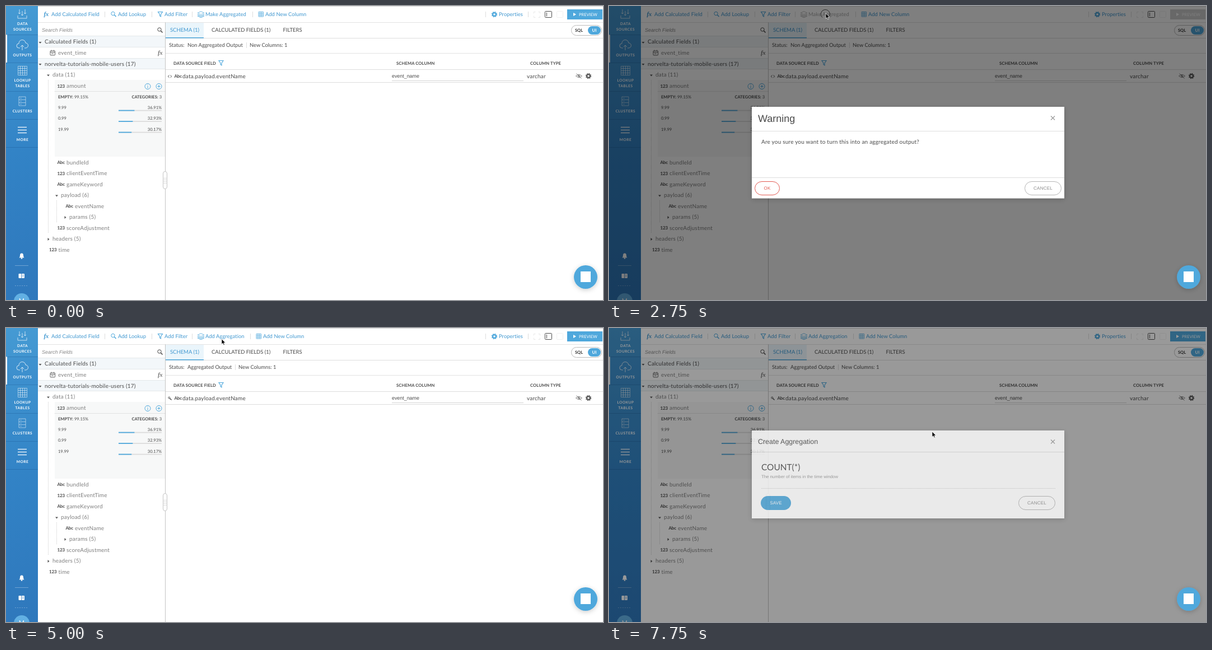
These frames come from a looping animation (1066 by 525 pixels, 8000 ms). An HTML page:

```html
<!DOCTYPE html>
<html lang="en">
<head>
<meta charset="utf-8">
<title>Aggregated output</title>
<style>
html, body { margin: 0; width: 100%; height: 100%; overflow: hidden; background: #fff; }
svg { display: block; width: 1066px; height: 525px; }
text { font: 10px Lato, sans-serif; letter-spacing: .2px; fill: #4a4a4a; white-space: pre; text-rendering: geometricPrecision; }
.tree { fill: #808080; }
.tool { font-size: 9.4px; letter-spacing: .06px; fill: #3f97d0; }
.stat { font-size: 9.4px; letter-spacing: -.02px; }
.tab { font-size: 9.5px; letter-spacing: -.03px; }
.head { font-size: 7.6px; font-weight: 700; letter-spacing: .12px; }
.type { font-size: 8px; font-weight: 700; letter-spacing: -.2px; }
.mini { font-size: 7.5px; letter-spacing: 0; }
.nav { font-size: 6.6px; font-weight: 700; letter-spacing: .45px; fill: #fff; }
.big { font-size: 11px; letter-spacing: .05px; }
.side { font-size: 10.3px; letter-spacing: .04px; }
.title { font-size: 15.4px; letter-spacing: 0; }
.bold { font-weight: 700; }
.sans { font-family: "Liberation Sans", Arial, sans-serif; letter-spacing: 0; }
.hint { font: italic 9px "Liberation Sans", Arial, sans-serif; letter-spacing: 0; fill: #888; }
.btn { font: 8px "Liberation Sans", Arial, sans-serif; letter-spacing: .25px; }
.fx { font: italic 700 11px "Liberation Serif", serif; letter-spacing: -.3px; }
.blue { fill: #3f97d0; }
.mid { text-anchor: middle; }
.end { text-anchor: end; }
</style>
</head>
<body>
<svg id="stage" viewBox="0 0 1066 525"></svg>
<script>
const BLUE = '#4fa8dc', INK = '#4a4a4a', LOOP = 8000, STEP = 250;

const text = (x, y, s, cls = '', fill = '') =>
  `<text x="${x}" y="${y}" dy=".35em" class="${cls}"${fill && ` style="fill:${fill}"`}>${s}</text>`;
const sans = (x, y, s, size, fill = INK) =>
  `<text x="${x}" y="${y}" dy=".35em" class="sans" style="font-size:${size}px;fill:${fill}">${s}</text>`;
const rect = (x, y, w, h, fill, rx = 0, stroke = 'none') =>
  `<rect x="${x}" y="${y}" width="${w}" height="${h}" rx="${rx}" fill="${fill}" stroke="${stroke}"/>`;
const circle = (x, y, r, fill, stroke = 'none', more = '') =>
  `<circle cx="${x}" cy="${y}" r="${r}" fill="${fill}" stroke="${stroke}" ${more}/>`;
const path = (d, stroke = INK, w = 1, fill = 'none', more = '') =>
  `<path d="${d}" stroke="${stroke}" stroke-width="${w}" fill="${fill}" ${more}/>`;
const solid = (d, fill) => path(d, 'none', 0, fill);
const hline = (x, y, x2, c = '#ddd', more = '') => path(`M${x} ${y}H${x2}`, c, 1, 'none', more);
const vline = (x, y, y2, c = '#ddd', more = '') => path(`M${x} ${y}V${y2}`, c, 1, 'none', more);
const group = (id, body) => `<g id="${id}">${body}</g>`;
const soft = body => `<g filter="url(#soft)">${body}</g>`;
const DOTS = 'stroke-dasharray="1 1"';

const lens = (x, y, c) => circle(x, y, 3.2, 'none', c) + path(`M${x + 2.3} ${y + 2.3}l3.2 3.2`, c, 1.6);
const funnel = (x, y) => path(`M${x} ${y}h8l-3 4.5v4l-2 -1.5v-2.5z`, BLUE, 1.1);
const gear = (x, y, c) => circle(x, y, 2.9, 'none', c, 'stroke-width="2.2"') +
  circle(x, y, 4.4, 'none', c, 'stroke-width="1.6" stroke-dasharray="1.73 1.73"');
const layers = c => path('M342 12.5l6 -2.8 6 2.8 -6 2.8z', c, .8) +
  path('M342 15.2l6 2.8 6 -2.8M342 17.7l6 2.8 6 -2.8', c, 1.1);
const grid = (x, y, w, h, c, n) => {
  let d = `M${x} ${y}h${w}v${h}h${-w}z`;
  for (let i = 1; i < n; i++) d += `M${x} ${y + h * i / n}h${w}M${x + w * i / n} ${y}v${h}`;
  return path(d, c, .8);
};
const arrow = (x, y, open) => solid(open ? `M${x - 2.5} ${y - 1}h5l-2.5 3z` : `M${x - 1} ${y - 2.5}v5l3 -2.5z`, '#555');
const cross = (x, y) => path(`M${x - 3.5} ${y - 3.5}l7 7m0 -7l-7 7`, '#999', 1.2);
const pill = (x, y, w, h, s, fill, ink, stroke) =>
  (stroke ? rect(x + .5, y + .5, w - 1, h - 1, fill, h / 2, stroke) : rect(x, y, w, h, fill, h / 2)) +
  text(x + w / 2, y + h / 2, s, 'btn mid', ink);
const cancel = (x, y) => pill(x, y, 66, 25, 'CANCEL', '#fff', '#888', '#b5b5b5');

function nav() {
  const faint = 'rgba(255,255,255,.65)', pale = 'rgba(255,255,255,.85)';
  let s = rect(0, 0, 57, 525, 'url(#sky)') + rect(0, 51, 57, 50, 'rgba(0,70,150,.03)') + rect(0, 51, 2, 50, '#fff');
  for (const y of [51, 101, 152, 202, 252]) s += hline(0, y + .5, 57, 'rgba(10,60,120,.25)');
  const labels = [[32, 'DATA'], [42, 'SOURCES'], [87.5, 'OUTPUTS'], [133, 'LOOKUP'], [143, 'TABLES'], [188, 'CLUSTERS'], [238.5, 'MORE']];
  for (const [y, label] of labels) s += text(29.5, y, label, 'nav mid');
  s += path('M24 6v8m-2 -2l2 2 2 -2M34 6v8m-2 -2l2 2 2 -2M29 9v8m-2 -2l2 2 2 -2M21 17v5h16v-5', pale, .8);
  s += path('M25 75h-2a4 4 0 0 1 0 -8a6 6 0 0 1 12 -1a4.5 4.5 0 0 1 0 9h-2M29 79v-9m-3 3l3 -3 3 3', pale, .9);
  s += grid(21.5, 107.5, 16, 16, faint, 4);
  s += path('M23 162h12v16h-12zM23 167.3h12M23 172.6h12M25.5 164.6h2M25.5 170h2M25.5 175.3h2', faint, .8);
  s += path('M21 216.5h16M21 221.5h16M21 226.5h16', pale, 1.3);
  s += solid('M23.5 449.5q1.5 -1.5 1.5 -4q0 -4 3 -4t3 4q0 2.5 1.500 4z', '#fff') + circle(28, 450.5, 1.3, '#fff');
  s += rect(22.5, 478, 10.5, 8, '#fff', 1) + path('M27.7 478v8M29.5 480.5h2M29.5 483h2', '#2f79bd', .9);
  s += hline(16, 463.5, 40, 'rgba(255,255,255,.3)') + hline(16, 499.5, 40, 'rgba(255,255,255,.3)', 'stroke-dasharray="2 2"');
  return s + circle(28, 527, 14, '#62b0e3') + text(28, 526.5, 'M', 'mid big', '#fff');
}

function toolbar() {
  let s = hline(57, .5, 1066, '#d5d5d5') + hline(57, 29.5, 1066, '#e3e3e3');
  for (const x of [176.5, 260.5, 332.5, 856.5, 932.5]) s += vline(x, 10, 20);
  s += text(67.5, 14.5, 'fx', 'fx', '#3f97d0') + text(81, 15, 'Add Calculated Field', 'tool');
  s += lens(191, 13.5, BLUE) + text(200, 15, 'Add Lookup', 'tool');
  s += funnel(271.5, 10.5) + text(283, 15, 'Add Filter', 'tool');
  s += group('columnTool', vline(440.5, 10, 20) + grid(451, 10.5, 8.5, 8.5, BLUE, 3) + text(463, 15, 'Add New Column', 'tool'));
  s += group('make', text(356, 15, 'Make Aggregated', 'tool') + layers(BLUE));
  s += group('makeOff', text(356, 15, 'Make Aggregated', 'tool', '#aaa') + layers('#aaa') +
    path('M381 20.5A8 8 0 1 1 393.5 18', '#555'));
  s += group('add', group('flash', rect(365, 5, 46, 20, '#dde8f0')) + text(356, 15, 'Add Aggregation', 'tool') + layers(BLUE));
  s += gear(872, 15, BLUE) + text(880, 15, 'Properties', 'tool');
  s += path('M945.5 10.5h-3v3m0 4v3h3m5 0h3v-3m0 -4v-3h-3', '#e8e8e8') + rect(983.5, 9.5, 11, 11, 'none', 1, '#f0f0f0');
  s += rect(962.5, 9.5, 12, 11, 'none', 1, INK) + vline(965.5, 11.5, 18.5, INK);
  return s + group('preview', rect(1002, 6, 63, 18, 'inherit')) +
    solid('M1013 12v6l5 -3z', '#fff') + text(1023, 15, 'PREVIEW', 'mini', '#fff');
}

function sidebar() {
  let s = text(64, 43, 'Search Fields', 'hint') + lens(274, 42, INK);
  s += rect(57, 54, 227, 19, '#f3f7fa') + rect(57, 94, 227, 18, '#f3f7fa');
  for (const y of [53, 73, 93, 112]) s += hline(57, y + .5, 284, '#e4e8ea');
  s += arrow(61, 65, 1) + text(69, 63.5, 'Calculated Fields (1)');
  s += rect(79, 80, 8.5, 8, 'none', 1, '#666') + path('M79 82.5h8.5M81 78.5v2M85.5 78.5v2M81 85h4', '#666') +
    text(93, 83.5, 'event_time', 'tree') + text(271, 83, 'fx', 'fx', '#777');
  s += arrow(61, 104, 1) + text(69, 103, 'norvelta-tutorials-mobile-users (17)');
  s += vline(75.5, 132, 406, '#ccc', DOTS) + vline(90.5, 347, 387, '#ccc', DOTS);
  s += rect(87, 132, 197, 137, '#f7f8f8') + hline(87, 152.5, 284, '#ccc', DOTS);
  const rows = [
    [122.5, 83, 'data (11)', 1], [142.5, 108, 'amount', '123'], [279, 108, 'bundleId', 'Abc'],
    [298.5, 108, 'clientEventTime', '123'], [318, 108, 'gameKeyword', 'Abc'], [337.5, 98, 'payload (6)', 1],
    [357, 123, 'eventName', 'Abc'], [376.5, 113, 'params (5)', 0], [396, 108, 'scoreAdjustment', '123'],
    [415.5, 83, 'headers (5)', 0], [435, 93.5, 'time', '123']];
  for (const [y, x, label, kind] of rows)
    s += text(x, y, label, 'tree') + (kind.length ? text(x - 16.5, y + .5, kind, 'type') : arrow(x - 7.5, y + 1, kind));
  s += circle(253, 143.5, 5, 'none', BLUE) + path('M253 143v3.5M253 140.5v1.2', BLUE) +
    circle(273, 143.5, 5, 'none', BLUE) + path('M270.5 143.5h5M273 141v5', BLUE);
  s += text(93, 162, '<tspan class="bold">EMPTY:</tspan> 99.15%', 'mini') +
    text(278, 162, '<tspan class="bold">CATEGORIES:</tspan> 3', 'mini end');
  [['9.99', 36.91], ['0.99', 32.93], ['19.99', 30.17]].forEach(([value, share], i) => {
    const y = 181 + 19.5 * i;
    s += text(93, y, value, 'mini') + text(278, y, share + '%', 'mini end') +
      rect(201, y + 4.7, 77, 1.8, '#dcdcdc') + rect(201, y + 4.7, .77 * share, 1.8, BLUE);
  });
  s += vline(284.5, 29, 525, '#c4c4c4') + rect(280.5, 295.5, 7, 31, '#fff', 3.5, '#c4c4c4');
  for (let i = 0; i < 8; i++) s += rect(282 + 3 * (i % 2), 307 + 3 * (i >> 1), 1, 1, '#aaa');
  return s;
}

const status = (kind, x) => text(324, 70, kind, 'stat') + vline(x - 5.5, 65, 75) + text(x, 70, 'New Columns: 1', 'stat');

function table() {
  let s = rect(285, 30, 68, 27, '#eaf5fb') + hline(285, 57.5, 1066) + rect(285, 56, 68, 1.5, BLUE);
  s += text(293, 43, 'SCHEMA (1)', 'tab blue') + text(367, 43, 'CALCULATED FIELDS (1)', 'tab') + text(494.5, 43, 'FILTERS', 'tab');
  s += rect(1009.5, 34.5, 54, 18, '#fff', 9, '#bbb') + text(1016, 43.5, 'SQL', 'mini bold', '#333') +
    rect(1039, 36, 23, 15, BLUE, 7.5) + text(1050.5, 43.5, 'UI', 'mini mid bold', '#fff');
  s += text(291, 70, 'Status:', 'stat') + hline(285, 84.5, 1066, '#e2e2e2');
  s += group('plainStatus', status('Non Aggregated Output', 435) +
    path('M291.5 123.5l-2.3 2.2 2.3 2.2M293.5 123.5l2.3 2.2 -2.3 2.2'));
  s += group('aggStatus', status('Aggregated Output', 415) + circle(291.3, 124.5, 1.5, 'none', INK) + path('M292.3 125.5l3.2 3', INK, 1.5));
  s += text(299, 102, 'DATA SOURCE FIELD', 'head') + funnel(380, 97.5) +
    text(697, 102, 'SCHEMA COLUMN', 'head') + text(936, 102, 'COLUMN TYPE', 'head');
  s += hline(285, 113.5, 1066) + hline(285, 136.5, 1066);
  s += text(300.5, 125.5, 'Abc', 'type') + text(315, 125, 'data.payload.eventName');
  s += sans(689, 124.5, 'event_name', 8.9) + hline(689, 133.5, 924, '#d5d5d5') + text(930, 125, 'varchar');
  s += path('M1017.5 125q5.5 -5 11 0q-5.5 5 -11 0zM1018.5 120.5l9 9', '#777', .9) + circle(1023, 125, 1.5, 'none', '#777');
  return s + gear(1040, 125, '#5a5a5a');
}

const box = (x, y, w, h) => soft(rect(x, y, w, h, '#fff'));

function warning() {
  return box(255, 180, 558, 163.5) + sans(266, 201, 'Warning', 18) + cross(792.5, 200) +
    hline(255, 223.5, 813) + hline(255, 306.5, 813) +
    text(272, 242, 'Are you sure you want to turn this into an aggregated output?') +
    pill(260, 313, 45, 25, 'OK', '#fff', '#e25a52', '#e25a52') + cancel(742, 313);
}

function picker() {
  let s = box(87, 40, 894, 444) + sans(104, 76, 'Add Aggregation', 12.5) + cross(960, 60) +
    sans(104, 89.5, 'Please select an aggregation to use.', 7.8, '#999');
  s += rect(104.5, 96.5, 510, 342, 'none', 0, '#d8d8d8') + rect(110.5, 107.5, 174, 26, '#fff', 13, '#bbb') +
    rect(296.5, 107.5, 174, 26, '#fff', 13, '#bbb');
  s += sans(117, 120, 'All', 9) + solid('M269.5 118.5h6l-3 3z', '#666') + text(303, 120, 'Search Calculated Fields', 'hint');
  s += group('caret', rect(302, 114, 1, 11, '#333')) + hline(104, 145.5, 614) + rect(105, 146, 501.5, 71, '#e9f5fa');
  const items = [['COUNT(*)', 'items'], ['COUNT', 'values'], ['COUNT_IF', '`true` values'], ['COUNT_DISTINCT', 'distinct values']];
  items.forEach(([name, what], i) => {
    const y = 72 * i;
    s += text(117, 169.5 + y, name, 'big bold') + text(117, 184 + y, `The number of ${what} in the time window`, 'big') +
      pill(541, 170 + y, 54, 22, 'SELECT', BLUE, '#fff') + hline(104, 217.5 + y, 606.5);
  });
  s += vline(606.5, 146, 438, '#eee') + rect(608, 148, 5, 51, '#d0d0d0', 2);
  s += text(621, 79.5, 'COUNT(*)', 'side bold') + text(621, 93.5, 'The number of items in the time window', 'side');
  return s + cancel(104, 453);
}

function creator() {
  return box(255, 183, 558, 157) + sans(266, 203, 'Create Aggregation', 12.45) + cross(792.5, 203) + hline(255, 221.5, 813) +
    text(272, 249, 'COUNT(*)', 'title') + sans(272, 265.5, 'The number of items in the time window', 7.75, '#999') +
    hline(272, 286.5, 797, '#ccc', DOTS) + pill(271, 300, 54, 25, 'SAVE', BLUE, '#fff') + cancel(731, 300);
}

document.getElementById('stage').innerHTML =
  `<defs><linearGradient id="sky" x2="0" y2="1"><stop stop-color="#459ad3"/><stop offset=".5" stop-color="#3283c6"/><stop offset="1" stop-color="#2f78bc"/></linearGradient>
  <filter id="soft" x="-20%" y="-20%" width="140%" height="150%"><feDropShadow dx="0" dy="2" stdDeviation="4" flood-opacity=".2"/></filter></defs>` +
  rect(0, 0, 1066, 525, '#fff') + toolbar() + sidebar() + table() + nav() +
  group('shade', rect(0, 0, 1066, 525, '#000')) +
  group('warning', warning()) + group('picker', picker()) + group('creator', creator()) +
  soft(circle(1035, 484, 21, BLUE)) + rect(1026, 474, 18, 19, '#fff') +
  group('cursor', path('M0 0V9.5L2.2 7.6L3.8 11L5.3 10.3L3.8 7H6.8Z', '#fff', .7, '#000'));

const $ = id => document.getElementById(id);
const show = (id, on) => { $(id).style.display = on ? '' : 'none'; };

// Each track is a list of [time, ...values], eased in and out between neighbours.
function at(track, t) {
  const i = track.findIndex(k => k[0] > t);
  if (i < 0) return track[track.length - 1].slice(1);
  if (!i) return track[0].slice(1);
  const a = track[i - 1], b = track[i], p = (t - a[0]) / (b[0] - a[0]);
  return a.slice(1).map((v, j) => v + (b[j + 1] - v) * p * p * (3 - 2 * p));
}
const pointer = [[750, 212, 27], [1500, 395, 15], [1750, 406, 19], [2000, 387, 13], [2750, 387, 13],
  [3500, 288, 324], [4000, 290.5, 324], [5000, 385, 19.5], [6750, 385, 19.5], [7250, 577, 185]];
const fades = {
  warning: [[2250, 0], [2500, .4], [2750, 1], [3500, 1], [3750, .4], [4000, 0]],
  picker: [[5250, 0], [5500, .8], [5750, 1], [7250, 1], [7500, .5], [7750, 0]],
  creator: [[7500, 0], [7750, .8]]
};

function draw(now) {
  const t = Math.floor(now % LOOP / STEP) * STEP;
  const busy = t >= 2500 && t < 4000, agg = t >= 4000;
  let dim = 0;
  for (const id in fades) {
    const [opacity] = at(fades[id], t);
    show(id, opacity > 0);
    $(id).style.opacity = opacity;
    dim = Math.max(dim, opacity);
  }
  $('shade').style.opacity = dim / 2;
  show('make', !busy && !agg);
  show('makeOff', busy);
  show('add', agg);
  show('flash', t >= 5250 && t < 5750);
  show('plainStatus', !agg);
  show('aggStatus', agg);
  show('caret', (t + 250) % 1000 >= 500);
  $('columnTool').setAttribute('transform', `translate(${agg ? -4 : 0})`);
  $('preview').firstChild.setAttribute('fill', t >= 2500 && t < 4500 ? '#d2d2d2' : BLUE);
  show('cursor', t >= 750);
  $('cursor').setAttribute('transform', `translate(${at(pointer, t)})`);
  requestAnimationFrame(draw);
}
requestAnimationFrame(draw);
</script>
</body>
</html>
```
